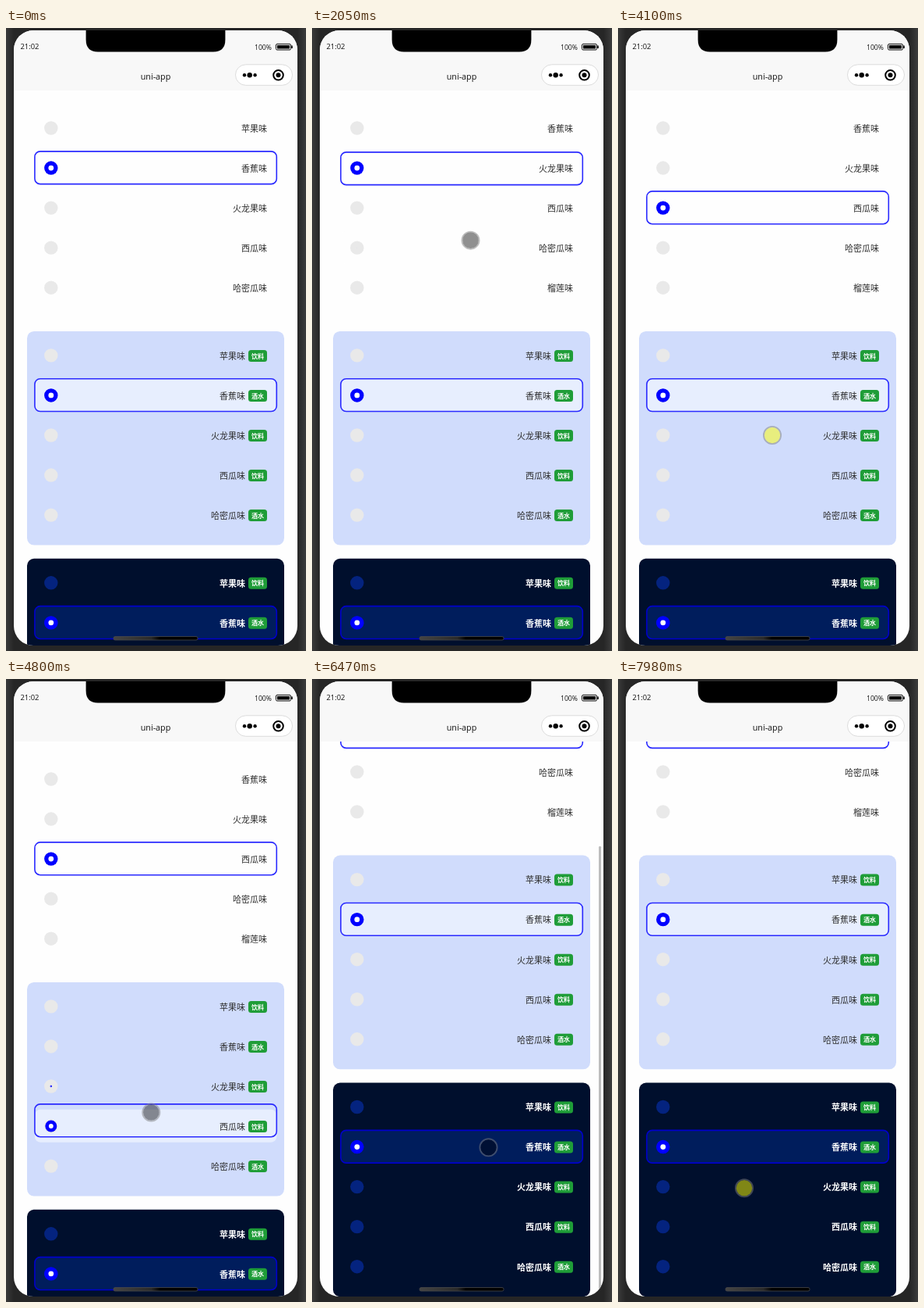
An HTML page for the animation above (8 s loop, 385 by 797 pixels).

```html
<!DOCTYPE html>
<html lang="zh">
<head>
<meta charset="utf-8">
<title>uni-app</title>
<style>
  html, body { margin: 0; width: 100%; height: 100%; overflow: hidden; background: #303030; }
  svg { display: block; width: 100vw; height: 100vh; }
  .ui { font-family: "Open Sans", "Noto Sans", sans-serif; fill: #111; }
  .cjk { font: 500 11px "Noto Sans CJK SC", "Noto Sans CJK", "Noto Sans CJK JP", sans-serif; text-anchor: end; }
  .dark { font-weight: 700; }
  .tag { font-size: 8px; font-weight: 700; text-anchor: middle; fill: #fff; }
</style>
</head>
<body>
<svg viewBox="0 0 385 797">
  <defs>
    <linearGradient id="back">
      <stop offset="0" stop-color="#3a3a3a"/><stop offset=".026" stop-color="#262626"/>
      <stop offset=".972" stop-color="#262626"/><stop offset="1" stop-color="#3c3c3c"/>
    </linearGradient>
    <linearGradient id="bar">
      <stop offset="0" stop-color="#444"/><stop offset=".45" stop-color="#2a2a2a"/><stop offset=".55" stop-color="#000"/>
    </linearGradient>
    <clipPath id="screen"><rect x="10" y="3" width="364" height="787" rx="25"/></clipPath>
    <clipPath id="card"><rect x="27" y="97" width="330" height="274"/></clipPath>
  </defs>
  <rect width="385" height="797" fill="url(#back)"/>
  <g clip-path="url(#screen)">
    <rect x="10" y="3" width="364" height="787" fill="#fefefe"/>
    <g id="page"></g>
    <rect id="thumb" x="368" width="3" height="568" rx="1.5" fill="#bdbdbd"/>
    <rect x="10" y="3" width="364" height="77" fill="#f8f8f8"/>
    <path d="M102.6 3H281.4V15Q281.4 30.4 266 30.4H118Q102.6 30.4 102.6 15Z"/>
    <g class="ui">
      <text x="18.5" y="27" font-size="9.4">21:02</text>
      <text x="341" y="27.5" font-size="8.7" text-anchor="end">100%</text>
      <text x="192" y="66" font-size="10.8" text-anchor="middle">uni-app</text>
    </g>
    <rect x="346.5" y="20.5" width="19" height="7.5" rx="1.5" fill="none" stroke="#111"/>
    <rect x="348" y="22" width="16" height="4.5"/>
    <rect x="366.3" y="22.5" width="1.5" height="3.5"/>
    <rect x="294.5" y="46.8" width="73" height="26.5" rx="13.2" fill="#fff" stroke="#dcdcdc"/>
    <circle cx="306" cy="60.3" r="2.2"/><circle cx="312.7" cy="60.3" r="3.2"/><circle cx="319.6" cy="60.3" r="2.2"/>
    <circle cx="349.5" cy="60.3" r="6.3" fill="none" stroke="#000" stroke-width="2"/>
    <circle cx="349.5" cy="60.3" r="3"/>
    <rect x="138" y="778.5" width="108" height="4.5" rx="2" fill="url(#bar)" stroke="#4a4a4a" stroke-width=".8"/>
  </g>
  <g id="cursor">
    <circle r="10.3"/>
    <circle r="11.1" fill="none" stroke="#808080" stroke-opacity=".5" stroke-width="1.8"/>
  </g>
</svg>
<script>
const LOOP = 8000, TOP = 97, STEP = 290.9, PITCH = 51.05, SLIDE = 300, PRESS = 110, SETTLE = 120;
const $ = id => document.getElementById(id);

function add(parent, tag, attrs, text) {
  const el = document.createElementNS('http://www.w3.org/2000/svg', tag);
  for (const k in attrs) el.setAttribute(k, attrs[k]);
  if (text) el.textContent = text;
  parent.appendChild(el);
  return el;
}

const clamp = v => Math.min(1, Math.max(0, v));
const mix = (a, b, p) => a + (b - a) * p;
const bez = (a, b, s) => 3 * a * s * (1 - s) ** 2 + 3 * b * s * s * (1 - s) + s ** 3;

// smooth step from 0 to 1 between two times
function ramp(t, from, to) {
  const p = clamp((t - from) / (to - from));
  return p * p * (3 - 2 * p);
}

// cubic-bezier(.25, .1, .25, 1)
function ease(x) {
  if (x <= 0 || x >= 1) return clamp(x);
  let lo = 0, hi = 1;
  for (let i = 0; i < 24; i++) {
    const mid = (lo + hi) / 2;
    if (bez(.25, .25, mid) < x) lo = mid; else hi = mid;
  }
  return bez(.1, 1, lo);
}

const listScroll = t => PITCH * ramp(t, 850, 1330);
const pageScroll = t => 162.3 * ramp(t, 5904, 6250);
const rowY = (list, row) => TOP + list * STEP + 31 + row * PITCH;

const flavours = ['苹果味', '香蕉味', '火龙果味', '西瓜味', '哈密瓜味', '榴莲味'];
const light = { radio: '#e9e9e9', text: '#2c2c2c', line: '#2a2aff' };
const lists = [
  { ...light, rows: 6, active: '#fefefe' },
  { ...light, rows: 5, panel: '#d0dcfc', active: '#e7eefe' },
  { rows: 5, panel: '#000f2d', active: '#001d5c', radio: '#04237f', text: '#fff', line: '#0000cc', dark: true }
];

const taps = [
  { at: 1570, list: 0, row: 2, x: 206 },
  { at: 1935, list: 0, row: 4, x: 203.5, dy: -9.5 },
  { at: 2620, list: 0, row: 3, x: 204 },
  { at: 4030, list: 1, row: 2, x: 198 },
  { at: 4520, list: 1, row: 3, x: 189 },
  { at: 5360, list: 1, row: 1, x: 188 },
  { at: 6700, list: 2, row: 4, x: 205 },
  { at: 7040, list: 2, row: 0, x: 172 },
  { at: 7370, list: 2, row: 1, x: 166 },
  { at: 7975, list: 2, row: 2, x: 162, dy: 1.7 }
];

// cursor stops: free points, plus a short rest around every tap
const stops = [
  { t: 540, x: 200, y: 567 }, { t: 900, x: 206, y: 215 },
  { t: 3210, x: 202.3, y: 337.5 }, { t: 4800, x: 186.3, y: 554.5 },
  { t: 5904, x: 367, y: 357.5 }, { t: 6250, x: 367, y: 488 }, { t: 6470, x: 226.5, y: 599.3 }
];
for (const { at, list, row, x, dy = 0 } of taps) {
  const y = rowY(list, row) + dy - pageScroll(at) - (list ? 0 : listScroll(at));
  stops.push({ t: at - SETTLE, x, y }, { t: at + PRESS, x, y });
}
stops.sort((a, b) => a.t - b.t);

const box = { x: 36.9, width: 310.4, height: 41.8, rx: 7 };

function build(list, n) {
  const holder = add($('page'), 'g', list.panel ? {} : { 'clip-path': 'url(#card)' });
  if (list.panel) add(holder, 'rect', { x: 27, y: TOP + n * STEP, width: 330, height: 273.7, rx: 9, fill: list.panel });
  list.body = add(holder, 'g', {});
  list.fill = add(list.body, 'rect', { ...box, fill: list.active });
  list.dots = flavours.slice(0, list.rows).map((name, i) => {
    const row = add(list.body, 'g', { transform: `translate(0 ${rowY(n, i)})` });
    add(row, 'circle', { cx: 57.8, r: 8.7, fill: list.radio });
    const dot = add(row, 'g', {});
    add(dot, 'circle', { r: 8.7, fill: '#00f' });
    add(dot, 'circle', { r: 3.4, fill: '#fff' });
    add(row, 'text', { class: list.dark ? 'cjk dark' : 'cjk', x: list.panel ? 307 : 335, y: 4.8, fill: list.text }, name);
    if (list.panel) {
      add(row, 'rect', { x: 311, y: -7, width: 24, height: 15, rx: 3.5, fill: '#1f9d38' });
      add(row, 'text', { class: 'cjk tag', x: 323, y: 3.6 }, i % 3 === 1 ? '酒水' : '饮料');
    }
    return dot;
  });
  list.frame = add(list.body, 'rect', { ...box, fill: 'none', stroke: list.line, 'stroke-width': 1.6 });
  list.picks = [{ t: -SLIDE, row: 1 }];
  for (const tap of taps) if (tap.list === n) list.picks.push({ t: tap.at + PRESS, row: tap.row });
}

function drawList(list, n, t) {
  const [now, was = now] = list.picks.filter(p => p.t <= t).reverse();
  const p = ease((t - now.t) / SLIDE);
  const boxY = row => rowY(n, row) - 21.2;
  list.fill.setAttribute('y', boxY(now.row));
  list.frame.setAttribute('y', boxY(mix(was.row, now.row, p)));
  list.dots.forEach((dot, i) => {
    const s = i === now.row ? p : i === was.row ? 1 - p : 0;
    dot.setAttribute('transform', `translate(57.8 0) scale(${s})`);
  });
}

function drawCursor(t) {
  const next = stops.find(s => s.t > t) || stops[stops.length - 1];
  const last = stops[Math.max(0, stops.indexOf(next) - 1)];
  const p = ramp(t, last.t, next.t);
  const down = taps.some(tap => t >= tap.at && t < tap.at + PRESS);
  $('cursor').setAttribute('transform', `translate(${mix(last.x, next.x, p)} ${mix(last.y, next.y, p)})`);
  $('cursor').setAttribute('visibility', t < stops[0].t ? 'hidden' : 'visible');
  $('cursor').firstElementChild.setAttribute('fill', down ? 'rgba(255,255,0,.5)' : 'rgba(0,0,0,.43)');
}

function draw(t) {
  const scroll = pageScroll(t);
  $('page').setAttribute('transform', `translate(0 ${-scroll})`);
  $('thumb').setAttribute('y', 83.7 + scroll * .802);
  $('thumb').setAttribute('opacity', t < 5900 ? 0 : 1 - ramp(t, 6850, 7000));
  lists[0].body.setAttribute('transform', `translate(0 ${-listScroll(t)})`);
  lists.forEach((list, n) => drawList(list, n, t));
  drawCursor(t);
}

lists.forEach(build);
const begin = performance.now();
function tick() {
  draw((performance.now() - begin) % LOOP);
  requestAnimationFrame(tick);
}
tick();
</script>
</body>
</html>
```
